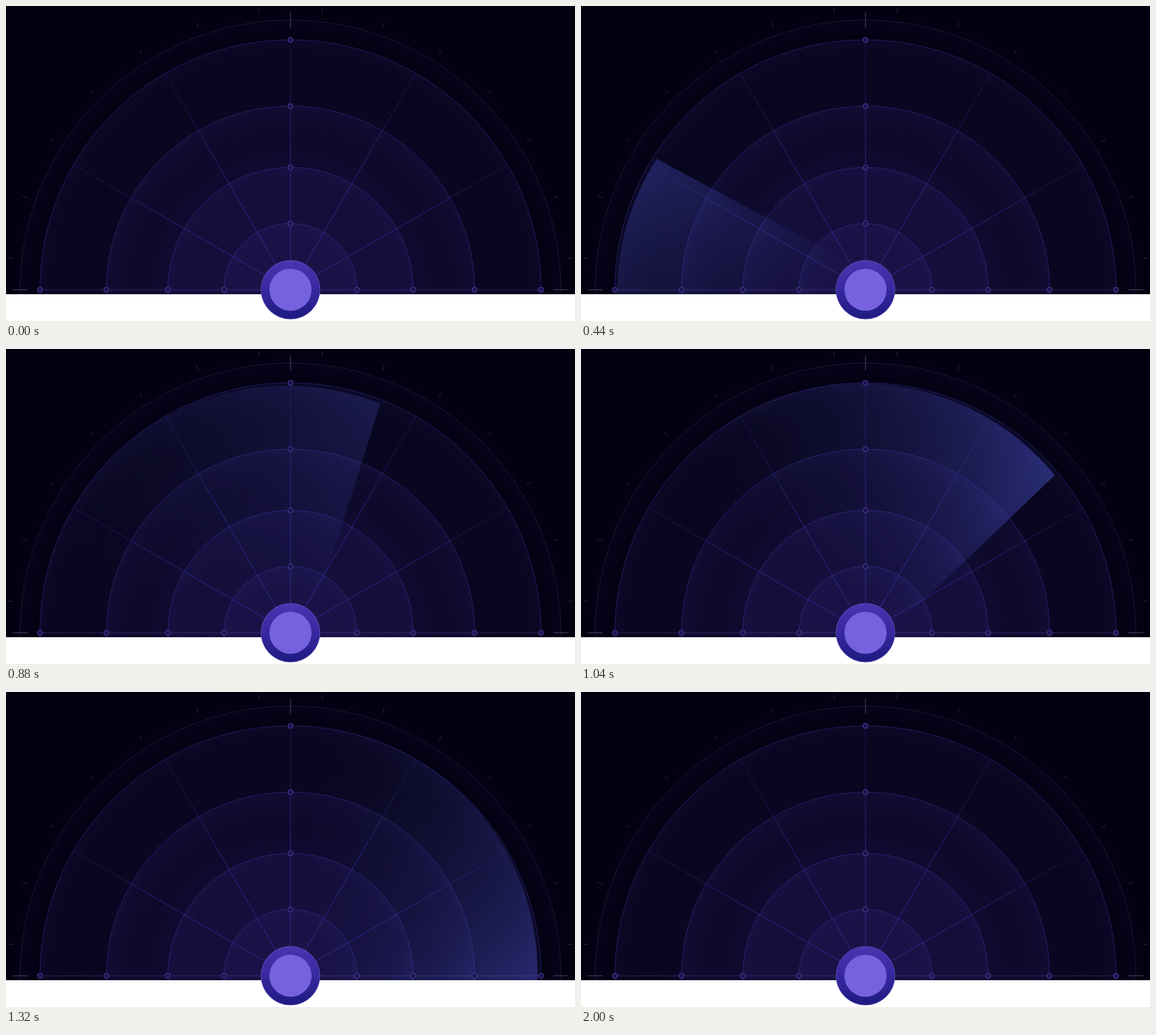
These frames come from a looping animation (890 by 494 pixels, 2.04 s). An HTML page with a canvas:

```html
<!DOCTYPE html>
<html lang="en">
<head>
<meta charset="utf-8">
<title>Radar sweep</title>
<style>
html, body { margin: 0; width: 100%; height: 100%; overflow: hidden; background: #fff; }
canvas { display: block; }
</style>
</head>
<body>
<canvas id="stage" width="890" height="494"></canvas>
<script>
const W = 890, H = 494, FLOOR = 452, C = 445;
const LOOP = 2040, STEP = 40;
const RINGS = [392, 288, 192, 104];
const TAU = Math.PI * 2, RAD = Math.PI / 180;
const ctx = document.getElementById('stage').getContext('2d');

function layer(w, h, draw) {
  const c = document.createElement('canvas');
  c.width = w;
  c.height = h;
  draw(c.getContext('2d'));
  return c;
}

function stops(gradient, rgb, list) {
  for (const [at, alpha] of list) gradient.addColorStop(at, `rgba(${rgb},${alpha})`);
  return gradient;
}

const radial = (g, r, rgb, list) => stops(g.createRadialGradient(C, C, 0, C, C, r), rgb, list);

function disc(g, x, y, r, fill, stroke, width = 1) {
  g.beginPath();
  g.arc(x, y, r, 0, TAU);
  if (fill) { g.fillStyle = fill; g.fill(); }
  if (stroke) { g.strokeStyle = stroke; g.lineWidth = width; g.stroke(); }
}

// Line along a ray; degrees run clockwise from the left horizon
function ray(g, deg, from, to, style) {
  const x = -Math.cos(deg * RAD), y = -Math.sin(deg * RAD);
  g.beginPath();
  g.moveTo(C + x * from, C + y * from);
  g.lineTo(C + x * to, C + y * to);
  g.strokeStyle = style;
  g.lineWidth = 1;
  g.stroke();
}

const ground = layer(W, FLOOR, g => {
  g.fillStyle = '#020110';
  g.fillRect(0, 0, W, FLOOR);
  disc(g, C, C, 460, radial(g, 460, '60,40,150', [[0, .3], [.25, .2], [.5, .12], [.75, .05], [1, 0]]));
  disc(g, C, C, 423, radial(g, 423, '60,50,150', [[0, 0], [.94, 0], [1, .05]]));
  for (const r of RINGS) {
    disc(g, C, C, r, radial(g, r, '70,56,180', [[0, .04], [1 - 60 / r, .045], [1 - 20 / r, .07], [1, .12]]));
  }
});

const grid = layer(W, FLOOR, g => {
  disc(g, C, C, 423, null, 'rgba(85,78,150,.3)');
  for (const r of RINGS) disc(g, C, C, r, null, 'rgba(85,72,205,.38)');
  const spoke = radial(g, 392, '75,64,225', [[0, .5], [.55, .5], [.75, .35], [1, .22]]);
  for (let a = 30; a < 180; a += 30) ray(g, a, 46, 392, spoke);
  for (const a of [0, 180]) ray(g, a, 46, 392, 'rgba(100,90,190,.38)');
  for (const a of [0, 90, 180]) ray(g, a, 411, 435, 'rgba(150,148,180,.5)');
  for (let i = 0; i < 14; i++) ray(g, (i + .5) * 180 / 14, 436, 444, 'rgba(140,138,165,.3)');
  for (const r of RINGS) {
    for (const [x, y] of [[-r, 0], [0, -r], [r, 0]]) disc(g, C + x, C + y, 4, '#1c1450', '#4c3f99');
  }
});

// Quarter beam pointing along +x, its leading edge 26 px ahead of the centre
const beam = layer(W, W, g => {
  g.beginPath();
  g.moveTo(C, C + 26);
  g.arc(C - 6, C - 4, 392, Math.asin(30 / 392), -Math.PI / 2, true);
  g.lineTo(C, C - 396);
  g.closePath();
  const fade = [0, .2, .4, .6, .8, 1].map(f => [f / 4, f ** 1.6]);
  g.fillStyle = stops(g.createConicGradient(-Math.PI / 2, C, C), '80,90,220', [...fade, [.5, 1]]);
  g.fill();
  g.globalCompositeOperation = 'destination-in';
  g.fillStyle = radial(g, 396, '0,0,0', [[0, 0], [.18, .02], [.5, .22], [.8, .42], [1, .52]]);
  g.fillRect(0, 0, W, W);
});

const badge = layer(W, H, g => {
  const body = g.createLinearGradient(0, C - 46, 0, C + 46);
  body.addColorStop(0, '#4b34b0');
  body.addColorStop(.5, '#38289f');
  body.addColorStop(1, '#1d1a80');
  disc(g, C, C, 46, body, '#5a4fb4');
  disc(g, C, C, 33, '#7662de');
});

function draw(now) {
  const t = Math.floor(now % LOOP / STEP) * STEP;
  ctx.fillStyle = '#fff';
  ctx.fillRect(0, 0, W, H);
  ctx.drawImage(ground, 0, 0);

  ctx.save();
  ctx.beginPath();
  ctx.rect(0, 0, W, FLOOR);
  ctx.clip();
  ctx.globalAlpha = Math.max(.08, Math.abs(Math.sin(Math.PI * (t - 690) / 1000)) ** 1.4);
  ctx.translate(C, C);
  ctx.rotate((180 + 28.3 + .18 * (t - 440)) * RAD);
  ctx.drawImage(beam, -C, -C);
  ctx.restore();

  ctx.drawImage(grid, 0, 0);
  ctx.drawImage(badge, 0, 0);
}

const start = performance.now();
function tick() {
  draw(performance.now() - start);
  requestAnimationFrame(tick);
}
draw(0);
requestAnimationFrame(tick);
</script>
</body>
</html>
```
